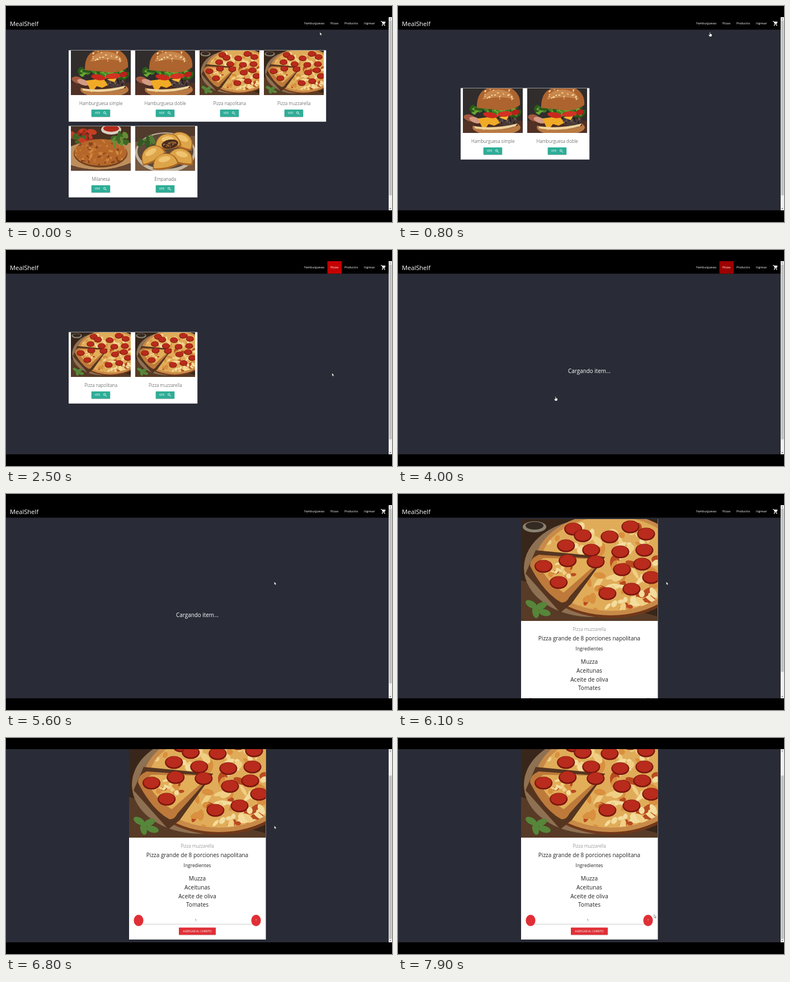
These frames come from a looping animation (690 by 388 pixels, 8000 ms). An HTML page:

```html
<!DOCTYPE html>
<html lang="es">
<head>
<meta charset="utf-8">
<title>MealShelf</title>
<style>
html, body { margin: 0; width: 100%; height: 100%; overflow: hidden; background: #000; }
svg { display: block; }
text { font-family: "Open Sans", "Noto Sans", sans-serif; }
.mid { text-anchor: middle; }
.light { font-weight: 300; }
</style>
</head>
<body>
<svg id="stage" width="690" height="388" viewBox="0 0 690 388">
  <defs>
    <clipPath id="view"><rect y="20" width="690" height="347"/></clipPath>
    <clipPath id="disc"><ellipse cx="160" cy="80" rx="125" ry="85"/></clipPath>
    <clipPath id="cutlet"><ellipse cx="53" cy="47" rx="47" ry="24"/></clipPath>
    <symbol id="pizza" viewBox="0 0 244 183" preserveAspectRatio="none"></symbol>
    <symbol id="burger" viewBox="0 0 107 80" preserveAspectRatio="none"></symbol>
    <symbol id="milanesa" viewBox="0 0 107 80" preserveAspectRatio="none"></symbol>
    <symbol id="empanada" viewBox="0 0 107 80" preserveAspectRatio="none"></symbol>
  </defs>
  <rect width="690" height="388"/>
  <g clip-path="url(#view)">
    <rect y="20" width="690" height="347" fill="#292c36"/>
    <g id="page">
      <rect y="18" width="690" height="24.5"/>
      <rect id="active" x="574.5" y="20" width="25.5" height="22.5" fill="#c40000"/>
      <g id="nav" fill="#fff" font-size="5.1">
        <text x="7" y="35.5" font-size="11.1">MealShelf</text>
        <path d="M670 27.5h1.6l2 4.3h3.2l1.3-3.3h-6" fill="#fff" stroke="#fff"/>
        <path d="M673.3 32l-.8 1.2h5" fill="none" stroke="#fff" stroke-width=".8"/>
        <circle cx="672.8" cy="34.7" r=".9"/><circle cx="676.8" cy="34.7" r=".9"/>
      </g>
      <g id="home"></g>
      <g id="burgers"></g>
      <g id="pizzas"></g>
      <text id="loading" class="mid" x="342" y="221" font-size="9.9" fill="#fff">Cargando item...</text>
      <g id="item"></g>
    </g>
    <rect x="684" y="20" width="6" height="347" fill="#f1f1f1"/>
    <path d="M685.5 24l1.5-1.8 1.5 1.8zM685.5 363l1.5 1.8 1.5-1.8z" fill="#555"/>
    <rect id="thumb" x="684.7" width="4.8" fill="#c1c1c1"/>
  </g>
  <g id="cursor" fill="#fff" stroke="#111" stroke-width=".4">
    <path id="arrow" d="M0 0V5.6L1.3 4.5 2.2 6.4 3.1 6 2.3 4.2H4z"/>
    <path id="hand" d="M-.6 .4Q0 -.4 .6 .4V3L3 3.6Q3.8 4 3.4 5.6L2.8 8H-.8L-2.6 5.2Q-2.8 4 -1.8 4.4L-.6 5.2z"/>
  </g>
</svg>
<script>
const $ = id => document.getElementById(id);
const add = (id, markup) => $(id).insertAdjacentHTML('beforeend', markup);
const oval = (x, y, rx, ry, fill, turn = 0) =>
  `<ellipse cx="${x}" cy="${y}" rx="${rx}" ry="${ry}" fill="${fill}" transform="rotate(${turn} ${x} ${y})"/>`;
const shape = (d, fill) => `<path d="${d}" fill="${fill}"/>`;
const label = (x, y, size, text, fill, cls = 'mid') =>
  `<text x="${x}" y="${y}" font-size="${size}" fill="${fill}" class="${cls}">${text}</text>`;

let seed = 7;
const random = () => (seed = seed * 16807 % 2147483647) / 2147483647;
function specks(n, [x, y, w, h], size, colors) {
  let out = '';
  for (let i = 0; i < n; i++)
    out += oval(x + random() * w, y + random() * h, size * (.5 + random()), size * (.3 + random() * .5),
      colors[i % colors.length], random() * 180);
  return out;
}

// Food pictures
const pepperoni = [[93, 17], [195, 13], [110, 29], [80, 47], [125, 55], [177, 58], [223, 26], [220, 55],
  [158, 31], [180, 90], [216, 80], [232, 104], [197, 125], [154, 133], [83, 74], [40, 84], [67, 113], [133, 76]];
const cheese = ['#f3dc9c', '#d9903f', '#f0cf85', '#b94a20'];
add('pizza',
  shape('M0 0H244V183H0z', '#38261a') + shape('M0 110L244 175V183H0z', '#573b26') +
  oval(24, 14, 21, 10, '#8b8271') + oval(24, 12, 16, 7, '#332a22') +
  oval(126, 88, 121, 88, '#8e7053') + oval(161, 87, 136, 91, '#70381a') + oval(160, 81, 135, 92, '#c88a48') +
  oval(160, 80, 125, 85, '#e0ac59') +
  `<g clip-path="url(#disc)">${specks(130, [30, 0, 214, 165], 9, cheese)}</g>` +
  shape('M150 68L26 56 8 98 70 168 90 152z', '#563520') +
  shape('M146 72L32 64Q16 70 16 84 40 132 72 150 82 150 86 140z', '#bd7a3b') +
  shape('M144 72L40 70Q30 76 32 84 50 116 76 132z', '#e2ae58') +
  specks(18, [42, 76, 58, 28], 6, cheese) +
  pepperoni.map(([x, y]) => oval(x, y + 1, 16, 11.5, '#7a160d') + oval(x, y, 14, 10, '#b92b1c')).join('') +
  [[18, 153, 30], [36, 156, -25], [26, 167, 80], [42, 168, 15]].map(([x, y, a]) => oval(x, y, 11, 6, '#56863a', a)).join(''));

add('burger',
  shape('M0 0H107V80H0z', '#302d2c') + shape('M0 58H107V80H0z', '#513126') +
  oval(60, 70, 43, 14, '#b97a43') + shape('M19 55Q60 72 98 52V67Q60 80 19 67z', '#4b2b20') +
  oval(80, 59, 17, 9, '#493a38') + specks(18, [66, 53, 28, 12], 2, ['#75605a', '#292020']) +
  oval(12, 53, 11, 6, '#a4593f', 15) + oval(22, 57, 11, 5, '#d49a83', 20) +
  shape('M27 54L58 50 66 62 56 67 46 64 37 76z', '#f0aa25') + shape('M64 52L83 47 78 57z', '#f5b936') +
  shape('M20 68Q60 73 98 63L94 68Q60 78 22 72z', '#eed39e') +
  specks(45, [16, 33, 84, 14], 7, ['#3e7d22', '#68a632', '#2c591b']) +
  oval(49, 48, 13, 5, '#c9291d', 10) + oval(75, 46, 13, 5, '#d33323', -5) + oval(94, 43, 7, 5, '#b7221b', -20) +
  shape('M25 35Q24 3 50 -2H83Q104 8 102 30 85 43 56 38z', '#ad642f') +
  shape('M35 20Q40 2 64 2 88 4 92 20 68 12 35 20z', '#c8874c') +
  specks(20, [38, 1, 52, 20], 1.7, ['#f5dba5']));

add('milanesa',
  shape('M0 0H107V80H0z', '#493021') + shape('M0 36Q50 15 107 30V66Q55 88 0 70z', '#bd8d5b') +
  shape('M0 70Q55 88 107 66V80H0z', '#654632') +
  specks(18, [0, 5, 42, 23], 7, ['#a62b1c', '#436628', '#c83d24']) +
  oval(72, 6, 18, 9, '#d9d0c4') + oval(72, 4, 14, 6, '#b42a19') +
  oval(53, 49, 48, 25, '#70401e') + oval(53, 47, 47, 24, '#b5672a') +
  `<g clip-path="url(#cutlet)">${specks(90, [6, 23, 94, 48], 3, ['#d18a3d', '#87451d', '#c27532'])}</g>` +
  specks(14, [74, 14, 29, 18], 6, ['#648d36', '#3e6826']));

const pastry = (x, y, turn) => `<g transform="translate(${x} ${y}) rotate(${turn})">` +
  shape('M-24 10Q-20 -14 2 -14 22 -12 24 10 0 19 -24 10z', '#a96523') +
  shape('M-22 8Q-18 -14 2 -13 20 -11 21 8 0 14 -22 8z', '#dda449') + oval(0, -4, 11, 5, '#efc470') + '</g>';
add('empanada',
  shape('M0 0H107V80H0z', '#765940') + shape('M0 0H107V17L0 28z', '#513b2c') +
  oval(54, 47, 54, 36, '#c3b6a0') + oval(54, 45, 50, 32, '#5c4939') +
  specks(14, [9, 22, 28, 14], 6, ['#547b35', '#365725']) +
  pastry(83, 25, 25) + pastry(58, 27, -5) + oval(62, 32, 15, 8, '#4a2c1c', -10) +
  specks(14, [51, 28, 22, 8], 2, ['#84522e', '#a57542']) +
  pastry(30, 50, -30) + pastry(82, 54, 15) + pastry(53, 63, -12));

// Pages
[[533, 'Hamburguesas'], [580, 'Pizzas'], [605, 'Productos'], [640, 'Ingresar']]
  .forEach(([x, text]) => add('nav', label(x, 33, 5.1, text, '#fff', '')));

function card(id, col, y, [pic, name]) {
  const x = 112 + col * 115;
  add(id, `<rect x="${x}" y="${y - .5}" width="115.2" height="128.3" fill="#fff"/>
    <use href="#${pic}" x="${x + 4}" y="${y}" width="107" height="80"/>
    ${label(x + 57.7, y + 98, 8.1, name, '#333', 'mid light')}
    <rect x="${x + 40.7}" y="${y + 107}" width="33.5" height="13" rx=".8" fill="#0003"/>
    <rect x="${x + 40.7}" y="${y + 106}" width="33.5" height="13" rx=".8" fill="#2fad97"/>
    <text x="${x + 46.8}" y="${y + 114.3}" font-size="5" letter-spacing=".2" fill="#fff">VER</text>
    <path d="M${x + 65.6} ${y + 113}l2.4 2.4" stroke="#fff" stroke-width=".9"/>
    <circle cx="${x + 64.2}" cy="${y + 111.6}" r="1.8" fill="none" stroke="#fff" stroke-width=".8"/>`);
}
const menu = [['burger', 'Hamburguesa simple'], ['burger', 'Hamburguesa doble'], ['pizza', 'Pizza napolitana'],
  ['pizza', 'Pizza muzzarella'], ['milanesa', 'Milanesa'], ['empanada', 'Empanada']];
menu.forEach((dish, i) => card('home', i % 4, i < 4 ? 80 : 216, dish));
menu.slice(0, 2).forEach((dish, i) => card('burgers', i, 148, dish));
menu.slice(2, 4).forEach((dish, i) => card('pizzas', i, 148, dish));

add('item', `<rect x="220" y="45" width="244.5" height="366" fill="#fff"/>
  <use href="#pizza" x="220" y="45" width="244.5" height="183"/>` +
  label(342, 246, 8.1, 'Pizza muzzarella', '#666', 'mid light') +
  label(342, 263, 10, 'Pizza grande de 8 porciones napolitana', '#222') +
  label(342, 281, 8.4, 'Ingredientes', '#222') +
  ['Muzza', 'Aceitunas', 'Aceite de oliva', 'Tomates'].map((s, i) => label(342, 305 + i * 15.8, 10.1, s, '#222')).join('') +
  '<path d="M237 383.5H447" stroke="#aaa" stroke-width=".6"/>' +
  oval(237, 376.8, 8.6, 10.3, '#e02f36') + oval(447, 376.8, 8.6, 10.3, '#e02f36') +
  label(447, 378.3, 4.5, '+', '#fff') + label(339, 377.5, 5.4, '1', '#333') +
  `<rect x="309" y="390.5" width="66" height="13" rx=".8" fill="#0003"/>
  <rect x="309" y="389.5" width="66" height="13" rx=".8" fill="#e02f36"/>` +
  label(342, 397.8, 5, 'AGREGAR AL CARRITO', '#fff'));

// Motion: rows of time followed by values, linear in between
const path = [[0, 561, 47], [200, 553, 37], [400, 553, 37], [600, 557.7, 47], [800, 557.7, 47], [1200, 586, 34],
  [1700, 586, 34], [2500, 582.8, 221], [2600, 582.8, 221], [3400, 282, 261], [3800, 281.7, 263], [4000, 281.7, 263],
  [4800, 479.5, 157.5], [7100, 479.5, 157.5], [7900, 457.8, 317.3]];
const scrolling = [[0, 0], [6300, 0], [6400, 3], [6600, 18], [6800, 49]];
const redness = [[0, 0], [1300, 0], [1500, 1], [3900, 1], [4000, .8], [4300, 0]];

function at(rows, t) {
  const i = rows.findIndex(r => r[0] > t);
  if (i < 0) return rows[rows.length - 1].slice(1);
  const a = rows[i - 1], b = rows[i], k = (t - a[0]) / (b[0] - a[0]);
  return a.slice(1).map((v, j) => v + (b[j + 1] - v) * k);
}
const within = (t, a, b) => t >= a && t < b;
const show = (id, on) => $(id).style.display = on ? '' : 'none';

function draw(now) {
  const t = Math.floor(now % 8000 / 100) * 100;
  show('home', t < 400);
  show('burgers', within(t, 400, 1500));
  show('pizzas', within(t, 1500, 4000));
  show('loading', within(t, 4000, 6000));
  show('item', t >= 6000);
  $('active').setAttribute('opacity', at(redness, t)[0]);

  const [scroll] = at(scrolling, t), height = t < 6000 ? 370 : 396;
  $('page').setAttribute('transform', `translate(0 ${-scroll})`);
  $('thumb').setAttribute('y', 26 + scroll / height * 335);
  $('thumb').setAttribute('height', 347 / height * 335);

  const hand = within(t, 100, 900) || within(t, 1100, 1800) || within(t, 3300, 4100);
  $('cursor').setAttribute('transform', `translate(${at(path, t)})`);
  show('hand', hand);
  show('arrow', !hand);
  requestAnimationFrame(() => draw(performance.now() - start));
}
const start = performance.now();
draw(0);
</script>
</body>
</html>
```
